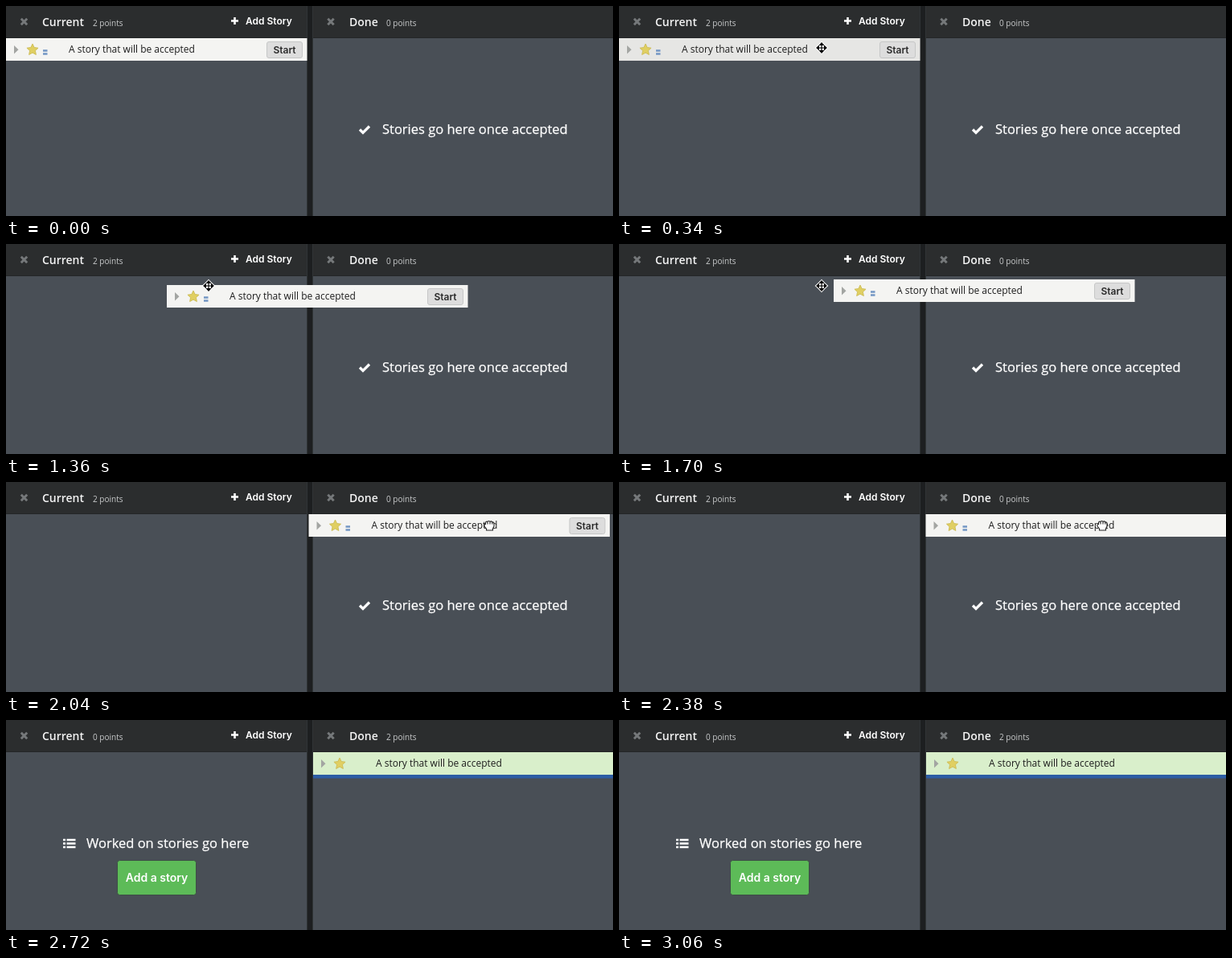
Animation of 755 by 261 pixels, one loop 4080 ms. Source, as an HTML page:

```html
<!DOCTYPE html>
<html lang="en">
<head>
<meta charset="utf-8">
<title>Dragging a story to Done</title>
<style>
  html, body { margin: 0; width: 100%; height: 100%; overflow: hidden; background: #494f56; }
  svg { display: block; width: 755px; height: 261px; font-family: "Open Sans", sans-serif; }
  .title { font-size: 14px; font-weight: 600; fill: #f4f4f4; }
  .points { font-size: 10px; fill: #c9cbcc; }
  .story { font-size: 12px; fill: #1d1d1d; }
  .hint { font-size: 16.5px; fill: #fff; stroke: #fff; stroke-width: .25px; }
  .label { font-family: Inter, "Liberation Sans", sans-serif; font-weight: 600; font-size: 12px; }
</style>
</head>
<body>
<svg viewBox="0 0 755 261">
  <defs>
    <path id="close" d="M-3.7-3.7 3.7 3.7M3.7-3.7-3.7 3.7" stroke="#75787a" stroke-width="3"/>
    <path id="arrows" d="M-5 0H5M0-5V5M-3.6-2.2-6 0-3.6 2.2ZM3.6-2.2 6 0 3.6 2.2ZM-2.2-3.6 0-6 2.2-3.6ZM-2.2 3.6 0 6 2.2 3.6Z"/>
  </defs>

  <rect width="755" height="261" fill="#494f56"/>
  <rect width="755" height="40" fill="#2b2d2e"/>
  <rect y="39" width="755" height="1" fill="#242627"/>
  <rect x="375" width="7" height="261" fill="#1d1f20"/>
  <path d="M374.5 0V261M381.5 0V261" stroke="#303436"/>

  <use href="#close" x="22.5" y="19.5"/>
  <text class="title" x="45" y="25">Current</text>
  <text class="points" id="currentPoints" x="108" y="25"></text>
  <path d="M280 18.5H289M284.5 14V23" stroke="#fff" stroke-width="2.6"/>
  <text class="label" x="298" y="23" fill="#fff">Add Story</text>

  <use href="#close" x="404" y="19.5"/>
  <text class="title" x="427" y="25">Done</text>
  <text class="points" id="donePoints" x="473" y="25"></text>

  <g id="doneHint">
    <path d="M440 153.5 444 157.5 452 149.5" fill="none" stroke="#fff" stroke-width="3.2"/>
    <text class="hint" x="468" y="159">Stories go here once accepted</text>
  </g>

  <g id="currentHint">
    <path d="M71 149H74M71 153.5H74M71 158H74M75.5 149H86.5M75.5 153.5H86.5M75.5 158H86.5" stroke="#fff" stroke-width="2.3"/>
    <text class="hint" x="100" y="159">Worked on stories go here</text>
    <rect x="138.5" y="174.5" width="98" height="43" rx="3" fill="#5dbb58" stroke="#3d4f45"/>
    <text class="label" x="187.5" y="201" text-anchor="middle" fill="#fff" style="font-size:14px">Add a story</text>
  </g>

  <rect id="doneLine" x="382" y="68" width="373" height="4.5" fill="#2c5da5"/>
  <g id="row">
    <rect id="rowFill" width="374.5" height="28"/>
    <path d="M10 9 15.5 14.3 10 19.6Z" fill="#a3a5a2"/>
    <path id="star" stroke-width="1" stroke-linejoin="round"/>
    <path id="estimate" d="M46 15.5H51.5M46 19.5H51.5" stroke="#7396c4" stroke-width="2.4"/>
    <text class="story" x="78" y="18">A story that will be accepted</text>
    <g id="start">
      <rect x="324.5" y="4.5" width="44" height="20" rx="2.5" fill="#dddddd" stroke="#c6c7c7"/>
      <text class="label" x="346.5" y="18.5" text-anchor="middle" fill="#2a2a2a">Start</text>
    </g>
  </g>

  <g id="move" transform="translate(252 52)">
    <use href="#arrows" fill="#fff" stroke="#fff" stroke-width="3.2"/>
    <use href="#arrows" fill="#000" stroke="#000" stroke-width="1.2"/>
  </g>
  <path id="grab" transform="translate(601 54)" fill="#fff" stroke="#222" stroke-width="1.1" stroke-linejoin="round"
    d="M-3.5 6V4L-6 1Q-6.5-1.5-4.5-1.5V-3.5Q-4-5.5-2-4.5Q-.5-6.5 1-4.5Q3-6 3.8-4Q6-4.5 6-2V1L4.5 4V6ZM-2-4V-1.5M1-4V-1.5M3.8-3.5V-1.5"/>
</svg>
<script>
const LOOP = 4080;
const el = id => document.getElementById(id);
const show = (id, visible) => el(id).style.display = visible ? "" : "none";

const WHITE = "#f4f4f2", HOVER = "#e6e6e4";
const ACCEPTED_HOVER = "#c6dcb4", ACCEPTED = "#d9efcb";

// Each step holds until the next: time, row x, row y, row colour, cursor
const steps = [
  [0, 0, 40, WHITE, ""],
  [170, 0, 40, HOVER, "move"],
  [1360, 200, 51, WHITE, "move"],
  [1530, 236, 47, WHITE, "move"],
  [1700, 267, 44, WHITE, "move"],
  [1870, 329, 41, WHITE, "move"],
  [2040, 376.5, 40, WHITE, "grab"],
  [2210, 381.5, 40, WHITE, "grab"],
  [2550, 382, 40, ACCEPTED_HOVER, "grab"],
  [2720, 382, 40, ACCEPTED, ""]
];

const starPoints = Array.from({ length: 10 }, (_, i) => {
  const angle = (i / 5 - 0.5) * Math.PI, radius = i % 2 ? 3.6 : 7.4;
  return `${33 + radius * Math.cos(angle)} ${14.5 + radius * Math.sin(angle)}`;
});
el("star").setAttribute("d", `M${starPoints.join("L")}Z`);

function draw(time) {
  const [, x, y, fill, cursor] = steps.findLast(step => step[0] <= time);
  const accepted = time >= 2550;
  const dimmed = fill === ACCEPTED_HOVER;

  el("row").setAttribute("transform", `translate(${x} ${y})`);
  el("rowFill").setAttribute("fill", fill);
  el("star").setAttribute("fill", dimmed ? "#cfd07a" : "#e0cf62");
  el("star").setAttribute("stroke", dimmed ? "#c4c46c" : "#cfbf5a");

  show("estimate", !accepted);
  show("start", time < 2380);
  show("move", cursor === "move");
  show("grab", cursor === "grab");
  show("doneHint", !accepted);
  show("currentHint", accepted);
  show("doneLine", accepted);
  el("currentPoints").textContent = `${accepted ? 0 : 2} points`;
  el("donePoints").textContent = `${accepted ? 2 : 0} points`;
}

const origin = performance.now();
function tick() {
  draw((performance.now() - origin) % LOOP);
  requestAnimationFrame(tick);
}
tick();
</script>
</body>
</html>
```
